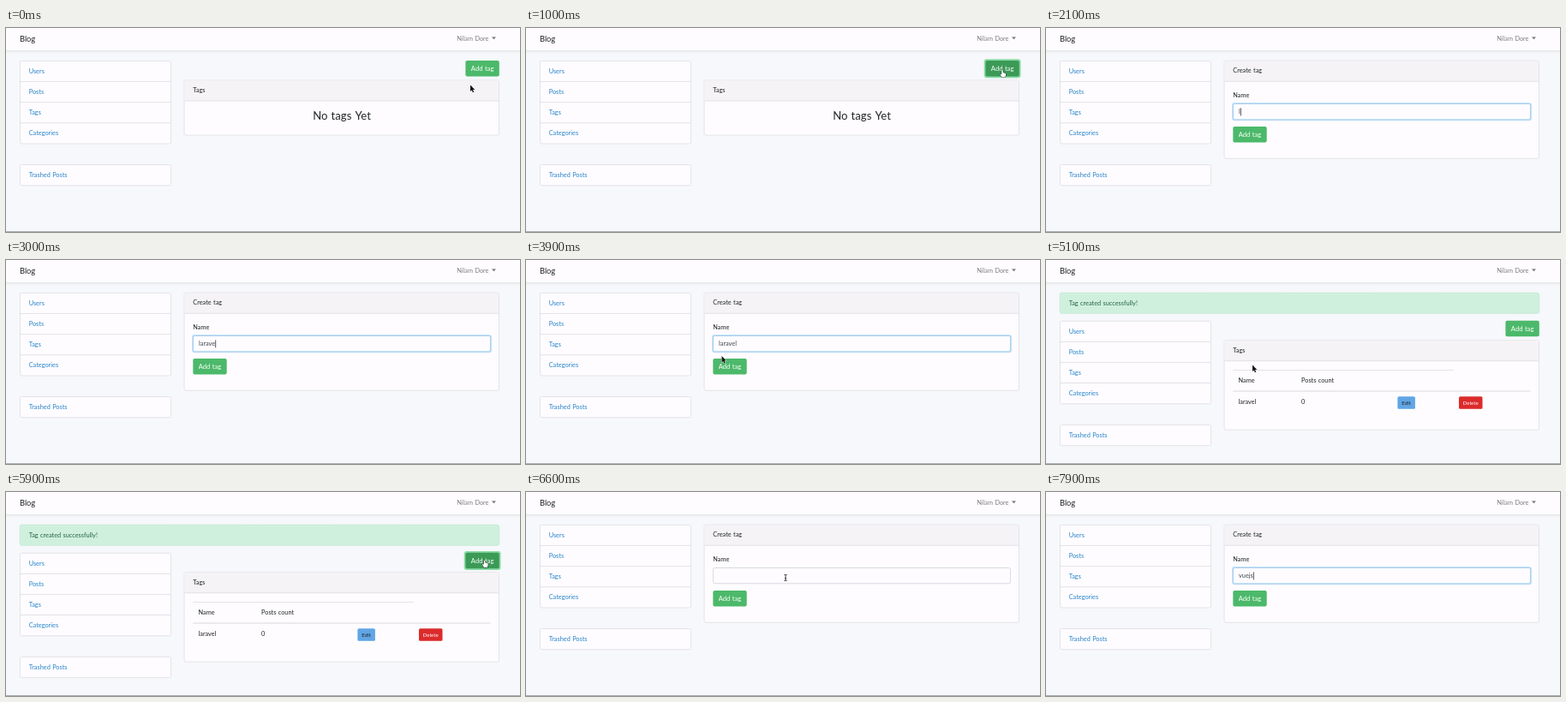
Animation, 600 px wide and 238 px high, one loop 8 s. Source, as an HTML page with a canvas:

```html
<!DOCTYPE html>
<html lang="en">
<head>
<meta charset="utf-8">
<title>Blog tags</title>
<style>
  html, body { margin: 0; width: 100%; height: 100%; overflow: hidden; background: #f6f8fb; }
  canvas { display: block; width: 600px; height: 238px; }
</style>
</head>
<body>
<canvas id="stage"></canvas>
<script>
const W = 600, H = 238, LOOP = 8000, STEP = 100;
const canvas = document.getElementById('stage');
const ctx = canvas.getContext('2d');
const dpr = window.devicePixelRatio || 1;
canvas.width = W * dpr;
canvas.height = H * dpr;

const C = {
  page: '#f6f8fb', card: '#fefcff', head: '#f5f3f6', line: '#dddde1',
  ink: '#212529', link: '#2583c9', green: '#4cb96a', greenDark: '#3c9a57',
  ring: 'rgba(82, 205, 122, .65)', blue: '#98cbee', blueRing: 'rgba(80, 165, 230, .32)'
};

// Page changes: [start, name]
const pages = [[0, 'empty'], [1100, 'create'], [5000, 'list'], [6100, 'create']];
// The top or form button is held down in these spans
const presses = [[800, 1100], [4300, 5000], [5800, 6100]];
// The input owns the focus from `focus` to `blur`
const entries = [
  { focus: 1700, blur: 4300, word: 'laravel', first: 2100, gap: 170 },
  { focus: 6800, blur: 8000, word: 'vuejs', first: 7200, gap: 150 }
];
// The pointer vanishes while typing
const hidden = [[2100, 3300], [7100, 8000]];
const path = [
  [0, 542, 66.5], [100, 542, 66.5], [500, 556, 49], [1100, 556, 49], [1500, 306, 98],
  [3400, 306, 98], [3900, 228.5, 112], [4200, 241, 122.5], [5100, 241, 122.5],
  [5700, 558.5, 79.5], [6100, 558.5, 79.5], [6500, 303, 100], [8000, 303, 100]
];

const within = (t, spans) => spans.some(([a, b]) => t >= a && t < b);
const last = (list, t) => list.filter(item => item[0] <= t).pop();
const inside = (p, b) => p.x >= b.x && p.x <= b.x + b.w && p.y >= b.y && p.y <= b.y + b.h;

function pointerAt(t) {
  const i = Math.min(path.indexOf(last(path, t)), path.length - 2);
  const [t0, x0, y0] = path[i], [t1, x1, y1] = path[i + 1];
  const u = (t - t0) / (t1 - t0), k = u * u * (3 - 2 * u);
  return { x: x0 + (x1 - x0) * k, y: y0 + (y1 - y0) * k };
}

function text(str, x, mid, { size = 7.35, color = C.ink, align = 'left' } = {}) {
  ctx.font = `${size}px Lato, "Open Sans", sans-serif`;
  ctx.wordSpacing = size * 0.07 + 'px';
  ctx.textAlign = align;
  ctx.fillStyle = color;
  ctx.fillText(str, x, mid + size * 0.345);
  return ctx.measureText(str).width;
}

function box(x, y, w, h, fill, stroke, r = 2) {
  ctx.beginPath();
  ctx.roundRect(x, y, w, h, r);
  ctx.fillStyle = fill;
  ctx.fill();
  if (stroke) {
    ctx.strokeStyle = stroke;
    ctx.lineWidth = 0.8;
    ctx.stroke();
  }
}

function rule(x0, x1, y, weight = 0.8) {
  ctx.fillStyle = C.line;
  ctx.fillRect(x0, y - weight / 2, x1 - x0, weight);
}

function navbar() {
  ctx.save();
  ctx.shadowColor = 'rgba(0, 0, 0, .11)';
  ctx.shadowBlur = 3 * dpr;
  ctx.shadowOffsetY = dpr;
  ctx.fillStyle = C.card;
  ctx.fillRect(-5, -5, W + 10, 31);
  ctx.restore();
  text('Blog', 16, 12.3, { size: 9.3 });
  text('Nilam Dore', 563.5, 12, { color: '#7f7e80', align: 'right' });
  ctx.fillStyle = '#737274';
  ctx.beginPath();
  ctx.moveTo(567, 10.6);
  ctx.lineTo(572, 10.6);
  ctx.lineTo(569.5, 13.2);
  ctx.fill();
}

function sidebar(y) {
  box(16.5, y + 0.5, 176, 96.5, C.card, C.line);
  ['Users', 'Posts', 'Tags', 'Categories'].forEach((label, i) => {
    if (i) rule(16.5, 192.5, y + 0.5 + i * 24.1);
    text(label, 26.7, y + 12.2 + i * 24.15, { color: C.link });
  });
  box(16.5, y + 121.5, 176, 24.3, C.card, C.line);
  text('Trashed Posts', 26.7, y + 133.6, { color: C.link });
}

function card(y, h, title) {
  box(208, y + 0.5, 367.5, h, C.card, C.line);
  box(208.4, y + 0.9, 366.7, 23.6, C.head, null, [2, 2, 0, 0]);
  rule(208, 575.5, y + 24.5);
  text(title, 218.3, y + 12.2);
}

function addButton(b, hover, down) {
  if (down) box(b.x - 1.7, b.y - 1.7, b.w + 3.4, b.h + 3.4, C.ring, null, 3);
  box(b.x, b.y, b.w, b.h, hover || down ? C.greenDark : C.green);
  text('Add tag', b.x + b.w / 2, b.y + b.h / 2, { size: 7.6, color: '#fff', align: 'center' });
}

function smallButton(label, x, w, fill, color) {
  box(x, 159.3, w, 14.4, fill, null, 1.5);
  text(label, x + w / 2, 166.5, { size: 6.2, color, align: 'center' });
}

function tagTable() {
  rule(218.3, 476, 128.5);
  text('Name', 224.5, 140.5);
  text('Posts count', 298, 140.5);
  rule(218.3, 565.5, 153, 1.1);
  text('laravel', 224.5, 165.3);
  text('0', 298, 165.3);
  smallButton('Edit', 410.4, 20.5, '#60a5e4', C.ink);
  smallButton('Delete', 482, 27.5, '#dc2b2b', '#fff');
}

function form(t, field) {
  const entry = entries.find(e => t >= e.focus) && entries.filter(e => t >= e.focus).pop();
  const current = entry && t < 6100 === entry.focus < 6100 ? entry : null;
  const focused = current && t < current.blur;
  text('Name', 218.3, 78);
  if (focused) box(field.x - 1.5, field.y - 1.5, field.w + 3, field.h + 3, C.blueRing, null, 3);
  box(field.x, field.y, field.w, field.h, C.card, focused ? C.blue : '#cdd2d8');
  if (!current) return;

  const { word, first, gap, focus } = current;
  const count = Math.max(0, Math.min(word.length, Math.floor((t - first) / gap) + 1));
  const width = text(word.slice(0, count), 225, 97.9, { color: '#42484e' });
  const lastKey = count ? first + (count - 1) * gap : focus;
  if (focused && Math.floor((t - lastKey) / 500) % 2 === 0) {
    ctx.fillStyle = '#333';
    ctx.fillRect(225.2 + width, 93.4, 0.8, 9);
  }
}

const shapes = {
  arrow: new Path2D('M0 0V7.4L1.7 5.9L2.9 8.7L4.2 8.1L3 5.4H5.3Z'),
  hand: new Path2D('M-.8 .6Q0 -.5 .8 .6V3L3.6 3.7Q4.4 4 4.2 5.2L3.5 8.4H-.6L-2.5 5.3Q-2.4 4 -.8 5.2Z'),
  beam: new Path2D('M-1.6 -3.6Q0 -3.6 0 -2.8Q0 -3.6 1.6 -3.6M0 -2.8V2.8M-1.6 3.6Q0 3.6 0 2.8Q0 3.6 1.6 3.6M-.9 .9H.9')
};

function pointer(p, kind) {
  ctx.save();
  ctx.translate(p.x, p.y);
  ctx.lineJoin = 'round';
  if (kind === 'beam') {
    ctx.strokeStyle = '#222';
    ctx.lineWidth = 0.9;
    ctx.stroke(shapes.beam);
  } else {
    const hand = kind === 'hand';
    ctx.strokeStyle = hand ? '#111' : '#fff';
    ctx.fillStyle = hand ? '#fff' : '#111';
    ctx.lineWidth = hand ? 0.9 : 1;
    ctx.stroke(shapes[kind]);
    ctx.fill(shapes[kind]);
  }
  ctx.restore();
}

function draw(t) {
  const page = last(pages, t)[1];
  const p = pointerAt(t);
  const shown = !within(t, hidden);
  const shift = page === 'list' ? 32.8 : 0;
  const button = page === 'create'
    ? { x: 218.3, y: 115, w: 39.4, h: 18.5 }
    : { x: 536.4, y: 38 + shift, w: 39.4, h: 18.5 };
  const field = { x: 218.5, y: 88.5, w: 347, h: 18.3 };
  const overButton = shown && inside(p, button);
  const overField = page === 'create' && inside(p, field);

  ctx.setTransform(dpr, 0, 0, dpr, 0, 0);
  ctx.fillStyle = C.page;
  ctx.fillRect(0, 0, W, H);
  navbar();
  sidebar(38 + shift);

  if (page === 'empty') {
    card(60.5, 64, 'Tags');
    text('No tags Yet', 392, 102.5, { size: 13.1, align: 'center' });
  } else if (page === 'create') {
    card(37.7, 114, 'Create tag');
    form(t, field);
  } else {
    box(16.3, 38.3, 559.4, 24, '#d0f0de', '#c1e9d2');
    text('Tag created successfully!', 26.7, 50.2, { color: '#25633f' });
    card(93.3, 104.3, 'Tags');
    tagTable();
  }
  addButton(button, overButton, within(t, presses));

  ctx.fillStyle = '#a8abb0';
  ctx.fillRect(0, 237, W, 1);
  if (shown) pointer(p, overButton ? 'hand' : overField ? 'beam' : 'arrow');
}

const start = performance.now();
function tick() {
  const t = (performance.now() - start) % LOOP;
  draw(Math.floor(t / STEP) * STEP);
  requestAnimationFrame(tick);
}
tick();
</script>
</body>
</html>
```
